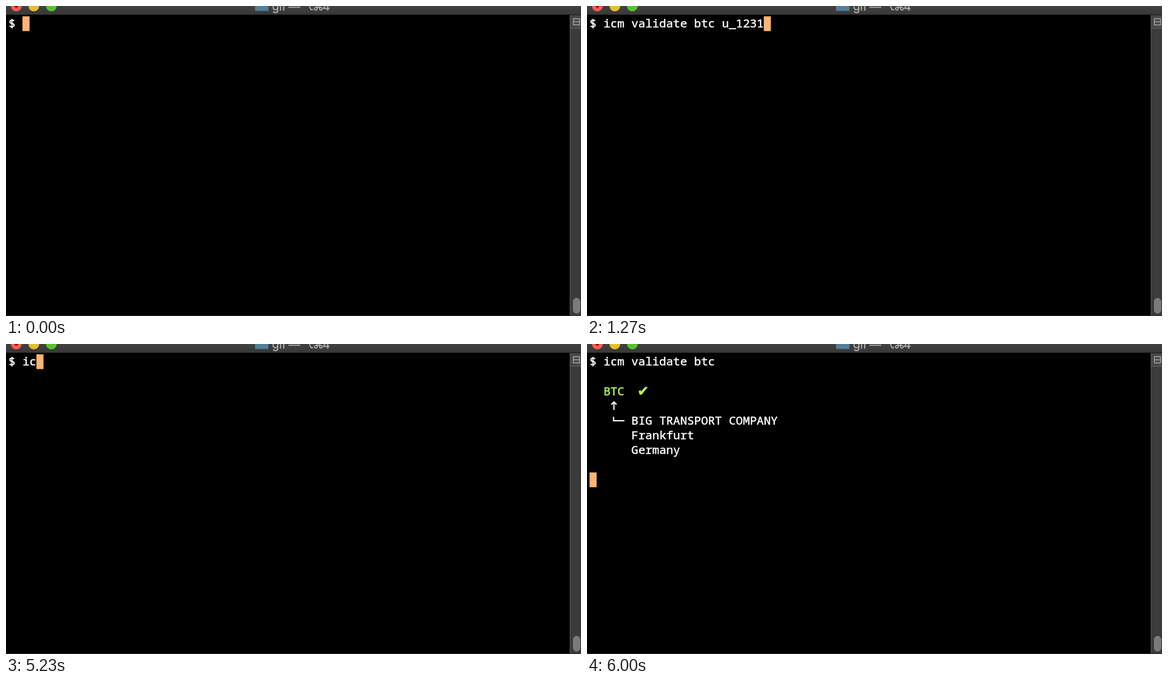
Animation of 1018x550 px, one loop 8 s. Source, as an HTML page with a canvas:

```html
<!DOCTYPE html>
<html lang="en">
<head>
<meta charset="utf-8">
<title>Terminal</title>
<style>
  html, body { margin: 0; width: 100%; height: 100%; overflow: hidden; background: #000; }
  canvas { display: block; }
</style>
</head>
<body>
<canvas id="stage" width="1018" height="550"></canvas>
<script>
const ctx = document.getElementById('stage').getContext('2d');
const LOOP = 8000;
const COL = 12.34, ROW = 26.2, LEFT = 4.5, TOP = 18.3, BASE = 38.2;
const WHITE = '#fff', GREEN = '#b0ff5c', CURSOR = '#ffb472';
const MONO = '20.57px "Noto Sans Mono", monospace';

const colX = c => LEFT + c * COL;
const rowY = r => TOP + r * ROW;

function box(x, y, w, h, color) {
  ctx.fillStyle = color;
  ctx.fillRect(x, y, w, h);
}

function disc(x, y, r, color) {
  ctx.fillStyle = color;
  ctx.beginPath();
  ctx.arc(x, y, r, 0, Math.PI * 2);
  ctx.fill();
}

// A thin outline gives the letters a slightly heavier weight.
function label(text, x, y, color, font, outline = 0.5) {
  ctx.font = font;
  ctx.fillStyle = ctx.strokeStyle = color;
  ctx.lineWidth = outline;
  ctx.lineJoin = 'round';
  ctx.fillText(text, x, y);
  ctx.strokeText(text, x, y);
}

function line(points, width, color) {
  ctx.strokeStyle = color;
  ctx.lineWidth = width;
  ctx.lineJoin = 'miter';
  ctx.beginPath();
  points.forEach(([x, y]) => ctx.lineTo(x, y));
  ctx.stroke();
}

const print = (text, col, row, color = WHITE) =>
  label(text, colX(col), BASE + row * ROW, color, MONO);

const cursor = (col, row) => box(colX(col), rowY(row), COL + 0.2, ROW, CURSOR);

function check(col, row) {
  label('✔', colX(col) - 2, BASE + 1.4 + row * ROW, GREEN, '25px "DejaVu Sans", sans-serif');
}

function arrow(col, row) {
  const x = colX(col + 0.5), y = rowY(row) + 13;
  line([[x, y - 6], [x, y + 7]], 2.2, WHITE);
  line([[x - 4.5, y - 2.5], [x, y - 7], [x + 4.5, y - 2.5]], 2.2, WHITE);
}

function pipe(col, row) {
  const x = colX(col + 0.5), y = rowY(row);
  line([[x, y + 4.5], [x, y + 22.5]], 2.2, WHITE);
}

function elbow(col, row) {
  const x = colX(col + 0.5) - 0.7, y = rowY(row) + 13;
  line([[x, y - 7], [x, y], [colX(col + 2), y]], 2.3, WHITE);
}

function company(row) {
  elbow(3, row);
  ['BIG TRANSPORT COMPANY', 'Frankfurt', 'Germany'].forEach((s, i) => print(s, 6, row + i));
}

function longResult() {
  print('BTC U 123123 3', 2, 2, GREEN);
  check(18, 2);
  arrow(3, 3);
  arrow(6, 3);
  pipe(3, 4);
  elbow(6, 4);
  print('freight container', 9, 4);
  pipe(3, 5);
  company(6);
}

function shortResult() {
  print('BTC', 2, 2, GREEN);
  check(7, 2);
  arrow(3, 3);
  company(4);
}

const LONG = 'icm validate btc u_123123-3';
const SHORT = 'icm validate btc';

// [time, characters typed]
const longKeys = [[0, 0], [370, 2], [460, 4], [550, 6], [640, 8], [730, 10], [820, 12],
  [910, 15], [1000, 17], [1090, 19], [1180, 21], [1270, 23], [1460, 25], [1550, 27]];
const shortKeys = [[4860, 0], [5230, 2], [5330, 4], [5420, 6], [5510, 8], [5600, 10],
  [5690, 12], [5780, 14], [5870, 16]];

function command(text, keys, t, entered) {
  const count = keys.filter(([at]) => at <= t).pop()[1];
  print('$ ' + text.slice(0, count), 0, 0);
  if (!entered) cursor(count + 2, 0);
}

function session(t) {
  if (t < 4760) {
    command(LONG, longKeys, t, t >= 1640);
    if (t >= 1690) longResult();
    if (t >= 4700) {
      print('$', 0, 10);
      cursor(2, 10);
    } else if (t >= 1690) cursor(0, 10);
    else if (t >= 1640) cursor(0, 1);
  } else if (t < 4860) {
    cursor(0, 0);
  } else {
    command(SHORT, shortKeys, t, t >= 5960);
    if (t >= 6000) {
      shortResult();
      cursor(0, 8);
    } else if (t >= 5960) cursor(0, 1);
  }
}

function titleBar() {
  const shade = ctx.createLinearGradient(0, 0, 0, 15);
  shade.addColorStop(0, '#414141');
  shade.addColorStop(1, '#383838');
  box(0, 0, 1018, 15, shade);
  box(0, 15, 1018, 1, '#1c1c1c');
  ['#ff5b53', '#e5bf2c', '#53c52b'].forEach((c, i) => disc(18.3 + 31 * i, 0, 9.5, c));
  disc(18.3, 0, 3, '#7c0b08');
  box(441, 0, 23.5, 9, '#557f99');
  box(441, 8, 23.5, 1.3, '#426579');
  const tone = '#b4b4b4', face = '20.5px Inter, sans-serif', symbols = '20px "DejaVu Sans", sans-serif';
  label('gif', 471, 7.7, tone, face, 0.3);
  line([[500, 2.3], [521, 2.3]], 1.7, tone);
  line([[531, -5], [535, -5], [540, 6.5], [543.5, 6.5]], 1.8, tone);
  label('⌘', 543, 7.5, tone, symbols, 0.3);
  label('4', 560.5, 7.7, tone, face, 0.3);
}

function scrollBar() {
  box(998, 16, 20, 533, '#3b3b3b');
  box(998, 16, 1, 533, '#555');
  box(999, 17, 19, 22, '#474747');
  box(998, 39, 20, 1, '#666');
  ctx.strokeStyle = '#acacac';
  ctx.lineWidth = 1.4;
  ctx.strokeRect(1004.5, 22.5, 11, 11);
  line([[1004.5, 28], [1015.5, 28]], 1.4, '#acacac');
  ctx.beginPath();
  ctx.roundRect(1004.5, 518.5, 11.5, 26.5, 5.75);
  ctx.fillStyle = '#7a7a7a';
  ctx.fill();
  ctx.strokeStyle = '#8c8c8c';
  ctx.lineWidth = 1;
  ctx.stroke();
}

function draw(now) {
  box(0, 0, 1018, 550, '#000');
  titleBar();
  scrollBar();
  box(0, 549, 1018, 1, '#35222b');
  session(now % LOOP);
  requestAnimationFrame(draw);
}
draw(0);
</script>
</body>
</html>
```
